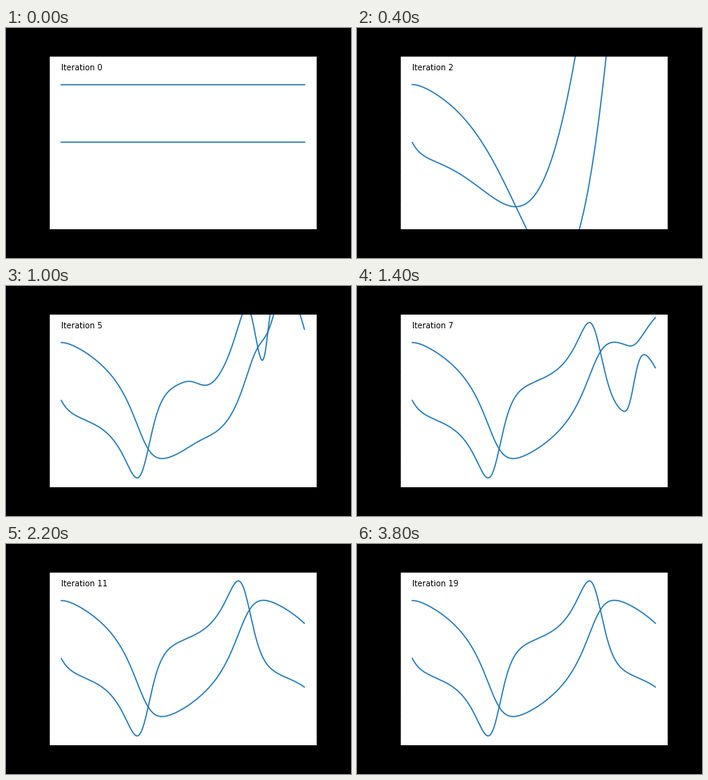
A matplotlib script that plays this animation: 432x288 px, repeating every 4000 ms.

```python
import numpy as np
import matplotlib.pyplot as plt
from matplotlib.animation import FuncAnimation

FRAMES = 20
T_END = 8.0
STEPS = 8000


def newton_step(x, y):
    """One Newton sweep for x' = y, y' = (1 - x^2) y - x (trapezoidal rule)."""
    k = T_END / STEPS / 2
    a = (-1 - 2 * x * y).tolist()
    d = (1 - x * x).tolist()
    c = (2 * x * x * y).tolist()
    u, v = float(x[0]), float(y[0])
    xs, ys = [u], [v]
    for i in range(STEPS):
        j = i + 1
        rhs = v + k * (a[i] * u + d[i] * v + c[i] + c[j])
        w = (rhs + k * a[j] * (u + k * v)) / (1 - k * d[j] - k * k * a[j])
        u, v = u + k * (v + w), w
        xs.append(u)
        ys.append(v)
    return np.array(xs), np.array(ys)


t = np.linspace(0, T_END, STEPS + 1)
sweeps = [(np.full_like(t, 2.0), np.zeros_like(t))]
while len(sweeps) < FRAMES:
    sweeps.append(newton_step(*sweeps[-1]))

fig, ax = plt.subplots(figsize=(6, 4), dpi=72, facecolor="black")
fig.subplots_adjust(left=0.125, right=0.9, bottom=0.125, top=0.88)
ax.set_xlim(-0.05 * T_END, 1.05 * T_END)
ax.set_ylim(-3, 3)

thin = slice(None, None, 8)
lines = [ax.plot([], [], color="#1f77b4", lw=1.5)[0] for _ in range(2)]
label = ax.text(0, 2.5, "", fontsize=10, family="DejaVu Sans")


def update(n):
    for line, values in zip(lines, sweeps[n]):
        line.set_data(t[thin], values[thin])
    label.set_text(f"Iteration {n}")
    return [*lines, label]


anim = FuncAnimation(fig, update, frames=FRAMES, interval=200,
                     repeat=True, repeat_delay=0)
plt.show()
```
